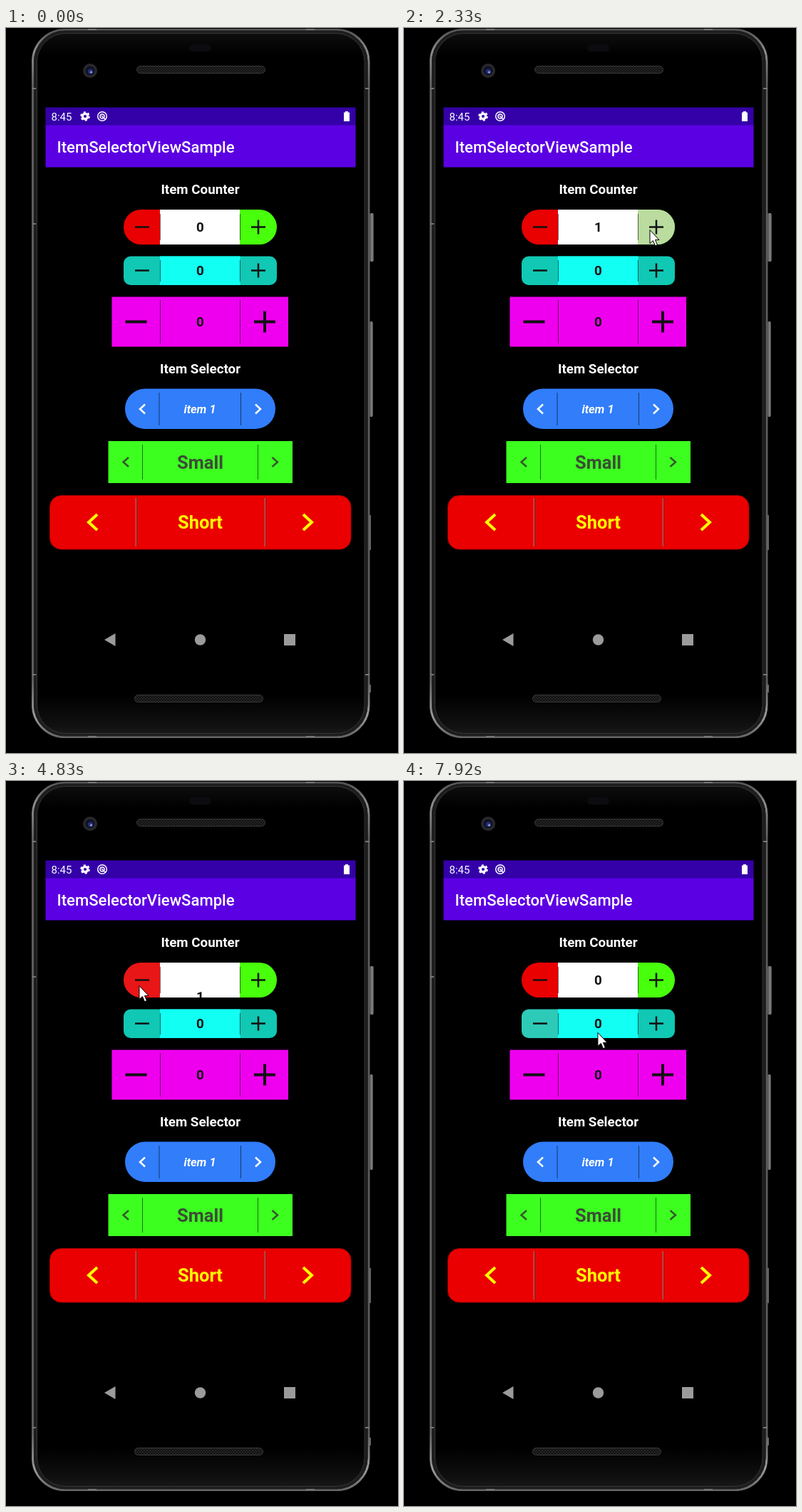
These frames come from a looping animation (550x1018 px, 8000 ms). An HTML page:

```html
<!DOCTYPE html>
<html lang="en">
<head>
<meta charset="utf-8">
<title>Item selector demo</title>
<style>
  html, body { margin: 0; width: 100%; height: 100%; overflow: hidden; background: #000; }
  svg { display: block; width: 550px; height: 1018px; font-family: Roboto, sans-serif; }
  .mid { text-anchor: middle; font-weight: 700; }
  .line { fill: none; stroke-width: 1; }
</style>
</head>
<body>
<svg viewBox="0 0 550 1018">
  <defs>
    <linearGradient id="body" x2="0" y2="1">
      <stop offset="0" stop-color="#101011"/><stop offset=".035" stop-color="#000"/>
      <stop offset=".94" stop-color="#000"/><stop offset=".985" stop-color="#111"/>
      <stop offset="1" stop-color="#1c1c1c"/>
    </linearGradient>
    <linearGradient id="rim" x2="0" y2="1">
      <stop offset="0" stop-color="#555"/><stop offset=".03" stop-color="#8c8c8c"/>
      <stop offset=".08" stop-color="#5c5c5c"/><stop offset=".92" stop-color="#5c5c5c"/>
      <stop offset=".97" stop-color="#9a9a9a"/><stop offset="1" stop-color="#666"/>
    </linearGradient>
    <linearGradient id="key"><stop stop-color="#444"/><stop offset=".6" stop-color="#888"/><stop offset="1" stop-color="#444"/></linearGradient>
    <pattern id="mesh" width="4" height="4" patternUnits="userSpaceOnUse">
      <path fill="#252525" d="M0 0h4v4H0z"/><path stroke="#111" d="M0 0l4 4M4 0L0 4"/>
    </pattern>
    <clipPath id="pill"><rect x="165" y="255" width="215" height="49" rx="24.5"/></clipPath>
    <clipPath id="round"><rect x="165" y="320.500" width="215" height="40.500" rx="10"/></clipPath>
    <clipPath id="count"><path d="M217 255h111v49H217z"/></clipPath>
  </defs>

  <g id="phone">
    <g fill="url(#key)">
      <rect x="510" y="260" width="6" height="68" rx="2"/><rect x="510" y="412" width="5" height="134" rx="2"/>
      <rect x="509" y="684" width="3" height="49"/><rect x="509" y="922" width="3" height="11"/>
    </g>
    <rect x="37.500" y="2.500" width="471.500" height="993" rx="45" fill="url(#body)" stroke="url(#rim)" stroke-width="3"/>
    <rect x="41" y="5.500" width="464.500" height="987" rx="42" fill="none" stroke="#1d1d1d" stroke-width="4"/>
    <rect x="43.500" y="7.500" width="459.500" height="983" rx="40" fill="none" stroke="#363636"/>
    <path d="M37 85h5M504 85h6M37 908h5M504 908h6M37 275h5M115 2h12M421 2h12M115 995h12M421 995h12" stroke="#777" stroke-width="2"/>
    <rect x="257" y="23" width="31" height="10" rx="5" fill="#0c0c10"/>
    <circle cx="118" cy="60" r="10" fill="#29292b"/><circle cx="118" cy="60" r="6.500" fill="#101226"/>
    <circle cx="118.500" cy="61" r="3.500" fill="#27307a"/><circle cx="119.500" cy="62" r="1.500" fill="#9aa4e0"/>
    <g fill="url(#mesh)" stroke="#383838">
      <rect x="183.500" y="53.500" width="180" height="10" rx="5"/><rect x="180.500" y="936.500" width="180" height="10" rx="5"/>
    </g>
  </g>

  <path fill="#3400a8" d="M55.500 111.500h435V137h-435z"/>
  <path fill="#5c00e4" d="M55.500 136.500h435v59h-435z"/>
  <g fill="#fff">
    <text x="63.500" y="130" font-size="15">8:45</text>
    <circle cx="111" cy="124" r="3.700" fill="none" stroke="#fff" stroke-width="3.200"/>
    <circle cx="111" cy="124" r="5.800" fill="none" stroke="#fff" stroke-width="2" stroke-dasharray="3.037"/>
    <g fill="none" stroke="#fff" stroke-width="1.500">
      <circle cx="135" cy="124" r="6.300"/><circle cx="135" cy="124" r="3"/><path d="M134 123l5 5"/>
    </g>
    <path d="M474 118.500h2v-1.500h4v1.500h2V131h-8z"/>
    <text x="71.500" y="174.700" font-size="22.100" font-weight="500">ItemSelectorViewSample</text>
    <g class="mid" font-size="18.800">
      <text x="272.500" y="233">Item Counter</text><text x="272.500" y="484.500">Item Selector</text>
    </g>
  </g>

  <g clip-path="url(#pill)">
    <path fill="#e90000" d="M165 255h52v49h-52z"/><path fill="#fff" d="M216 255h112v49H216z"/>
    <path fill="#48ff0c" d="M328 255h52v49h-52z"/>
    <g fill="#e0d0d0"><path id="minus" d="M165 255h51v49h-51z"/><path id="plus" d="M328 255h52v49h-52z"/></g>
  </g>
  <g clip-path="url(#round)">
    <path fill="#10c8b4" d="M165 320h215v41H165z"/><path fill="#12fff4" d="M216 320h112.500v41H216z"/>
    <path id="tealMinus" fill="#e0d0d0" d="M165 320h51v41h-51z"/>
  </g>
  <path fill="#ee00ee" d="M148.500 377.500H396v70H148.500z"/>
  <rect x="167" y="506.500" width="211" height="56.500" rx="28" fill="#317dfa"/>
  <path fill="#3cff20" d="M143.500 580H402v59H143.500z"/>
  <rect x="61.500" y="656.500" width="422.500" height="75.500" rx="16" fill="#ea0000" stroke="#a00"/>

  <g class="line">
    <path stroke="#000" stroke-opacity=".55" d="M216.500 261v37M328.500 261v37M216.500 326v30M328.500 326v30M216.500 382v61M328.500 382v61M215 512v46M329.500 512v46M191.500 585v49M353.500 585v49"/>
    <path stroke="#c08080" d="M182.500 660v68M363.500 660v68"/>
    <path stroke="#700" d="M183.500 660v68M364.500 660v68"/>
  </g>

  <g fill="none">
    <path stroke="#111" stroke-width="2.500" d="M181 279.500h20M344 279.500h20M354 269.500v20M181 340.500h20M344 340.500h20M354 330.500v20"/>
    <path stroke="#111" stroke-width="4" d="M167.500 412.500h30M348 412.500h30M363 397.500v30"/>
    <path stroke="#fff" stroke-width="2.500" d="M195 528.500l-7 6.500 7 6.500M350 528.500l7 6.500-7 6.500"/>
    <path stroke="#34582a" stroke-width="2.500" d="M172 603l-7.500 6.500 7.500 6.500M373.500 603l7.500 6.500-7.500 6.500"/>
    <path stroke="#ff0" stroke-width="4" d="M128 683l-12 11 12 11M417 683l12 11-12 11"/>
  </g>

  <g class="mid">
    <g font-size="18.800" fill="#111">
      <g clip-path="url(#count)"><text id="value" x="272.500">0</text></g>
      <text x="272.500" y="347.300">0</text><text x="272.500" y="419.300">0</text>
    </g>
    <text x="272" y="541" font-size="16.400" font-style="italic" fill="#fff">item 1</text>
    <text x="272.500" y="618.500" font-size="25.500" fill="#3c4c36">Small</text>
    <text x="272.500" y="703" font-size="25.500" fill="#ff0">Short</text>
  </g>

  <g fill="#9b9b9b">
    <path d="M138 859l15.500-9v18z"/><circle cx="272.500" cy="859" r="7.700"/><path d="M390 851h16v16h-16z"/>
  </g>

  <path id="cursor" fill="#fff" stroke="#000" d="M0 0V19L4.400 15L7.500 22.300L10.500 21L7.500 14H13Z"/>
</svg>
<script>
const LOOP = 8000, STEP = 1000 / 12;
const $ = id => document.getElementById(id);
const clamp = v => Math.min(1, Math.max(0, v));

// Cursor stops: time, x, y
const path = [
  [560, -15, 224], [830, 217, 260], [1400, 345, 283.5], [3950, 345, 283.5],
  [4400, 187, 287.5], [6700, 187, 287.5], [7100, 190, 342], [7660, 190, 342], [7920, 273, 353.5]
];
// Counter changes: time, new value
const changes = [[1650, 1], [2924, 2], [4528, 1], [5350, 0]];
// Button presses: press time, release time
const presses = {
  plus: [[1550, 1650], [2150, 2924]],
  minus: [[4480, 4528], [5250, 5350]],
  tealMinus: [[7480, 7560]]
};
const SLIDE = 200, TRAVEL = 49;

function cursorAt(t) {
  const i = path.findIndex(p => p[0] > t);
  if (i === 0) return path[0].slice(1);
  if (i < 0) return path[path.length - 1].slice(1);
  const [t0, x0, y0] = path[i - 1], [t1, x1, y1] = path[i];
  const k = (t - t0) / (t1 - t0);
  return [x0 + (x1 - x0) * k, y0 + (y1 - y0) * k];
}

// The old value leaves upwards, then the new one rises from below.
function counterAt(t) {
  let value = 0, offset = 0;
  for (const [start, next] of changes) {
    const k = (t - start) / SLIDE;
    if (k < 0) break;
    if (k < 1) offset = -TRAVEL * k;
    else {
      value = next;
      offset = TRAVEL * (1 - clamp(k - 1));
    }
  }
  return [value, offset];
}

const ripple = (t, [down, up]) =>
  .75 * clamp((Math.min(t, up) - down) / 150) * (1 - clamp((t - up) / 540));

function draw(now) {
  const t = Math.floor((now % LOOP + 4) / STEP) * STEP % LOOP;
  $('cursor').setAttribute('transform', `translate(${cursorAt(t)})`);
  const [value, offset] = counterAt(t);
  $('value').textContent = value;
  $('value').setAttribute('y', 286.3 + offset);
  for (const id in presses)
    $(id).setAttribute('opacity', Math.max(...presses[id].map(p => ripple(t, p))));
}

const begin = performance.now();
function tick() {
  draw(performance.now() - begin);
  requestAnimationFrame(tick);
}
tick();
</script>
</body>
</html>
```
